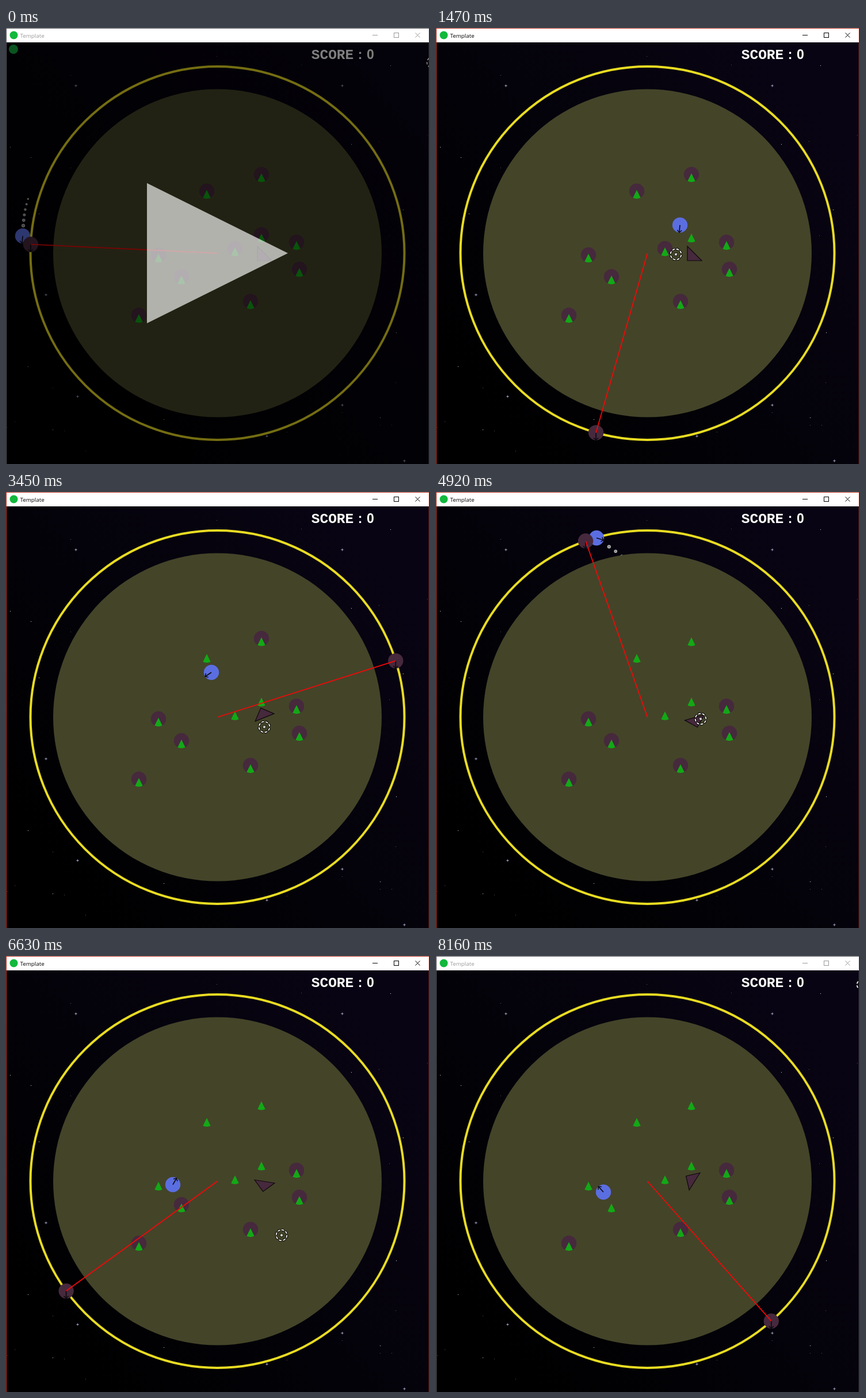
Recreate the animation shown at these times as an HTML page with a canvas. Size 737 by 759 pixels, loop 8.22 s.

```html
<!DOCTYPE html>
<html lang="en">
<head>
<meta charset="utf-8">
<title>Template</title>
<style>
  html, body { margin: 0; width: 100%; height: 100%; overflow: hidden; background: #000; }
  canvas { display: block; }
</style>
</head>
<body>
<canvas id="stage" width="737" height="759"></canvas>
<script>
const ctx = document.getElementById('stage').getContext('2d');
const LOOP = 8220, STEP = 30, START = 270, BLUR = 8130;
const CX = 367.5, CY = 392, RING = 325, REACH = 32;
const TAU = Math.PI * 2, DEG = Math.PI / 180;

// Key points: [time, ...values], interpolated linearly.
const player = [[-30, 38, 296, 95], [240, 29, 362, 95], [1060, 424, 343, 95], [1600, 424, 343, 95],
  [2250, 427, 368, 184], [2700, 357, 314, 146], [3700, 357, 314, 146], [4200, 435, 270, 50],
  [4780, 323, 109, 17], [4920, 279, 80, 17], [5280, 136, 103, -20], [6030, 288, 384, -60],
  [6630, 290, 398, -60], [8160, 291, 411, -132]];
const cursor = [[240, 741, 60], [960, 417, 394], [1920, 417, 394], [2250, 439, 394],
  [3450, 449, 409], [4920, 460, 395], [6120, 462, 423], [6630, 479, 486], [7740, 741, 50]];
const wedge = [[1920, 0], [2250, -66], [3450, -247], [4920, -421], [6630, -396], [8160, -283]];

const planets = [[444, 255], [349, 284], [444, 360], [505, 373], [398, 384],
  [265, 395], [510, 420], [305, 433], [425, 476], [231, 500]];
const bigStars = [[121, 100], [584, 100], [584, 656], [124, 641], [692, 753], [453, 710], [69, 464]];

function at(keys, t) {
  const i = keys.findIndex(k => k[0] > t);
  if (i <= 0) return keys[i ? keys.length - 1 : 0].slice(1);
  const a = keys[i - 1], b = keys[i], u = (t - a[0]) / (b[0] - a[0]);
  return a.slice(1).map((v, j) => v + (b[j + 1] - v) * u);
}

// A planet loses its disc once the player first comes within reach.
const visits = planets.map(([px, py]) => {
  for (let t = 0; t < LOOP; t += STEP) {
    const [x, y] = at(player, t);
    if (Math.hypot(x - px, y - py) < REACH) return t;
  }
  return Infinity;
});

function rect(x, y, w, h, color) {
  ctx.fillStyle = color;
  ctx.fillRect(x, y, w, h);
}

function disc(x, y, r, color) {
  ctx.fillStyle = color;
  ctx.beginPath();
  ctx.arc(x, y, r, 0, TAU);
  ctx.fill();
}

function ring(x, y, r, color, width) {
  ctx.strokeStyle = color;
  ctx.lineWidth = width;
  ctx.beginPath();
  ctx.arc(x, y, r, 0, TAU);
  ctx.stroke();
}

function path(points, stroke, width, fill) {
  ctx.beginPath();
  points.forEach(p => ctx.lineTo(...p));
  if (fill) {
    ctx.closePath();
    ctx.fillStyle = fill;
    ctx.fill();
  }
  if (stroke) {
    ctx.strokeStyle = stroke;
    ctx.lineWidth = width;
    ctx.stroke();
  }
}

function placed(x, y, degrees, draw) {
  ctx.save();
  ctx.translate(x, y);
  ctx.rotate(degrees * DEG);
  draw();
  ctx.restore();
}

function arrow(x, y, degrees) {
  placed(x, y, degrees, () => {
    path([[0, 0], [13, 0]], '#0a0a10', 1.6);
    path([[9, -4], [13, 0], [9, 4]], '#0a0a10', 1.4);
  });
}

function sky() {
  const g = ctx.createLinearGradient(60, 640, 680, 120);
  g.addColorStop(0, '#000');
  g.addColorStop(0.4, '#030208');
  g.addColorStop(1, '#090414');
  rect(0, 25, 737, 734, g);
  let seed = 7;
  const random = () => (seed = seed * 16807 % 2147483647) / 2147483647;
  for (let i = 0; i < 70; i++) {
    const x = Math.floor(random() * 735), y = Math.floor(25 + random() * 734);
    rect(x, y, 1, 1, i % 3 ? '#55555f' : '#d8d8e4');
  }
  for (const [x, y] of bigStars) {
    rect(x - 2, y, 5, 1, '#77779a');
    rect(x, y - 2, 1, 5, '#77779a');
    rect(x, y, 1, 1, '#fff');
  }
}

function smoke(t) {
  for (let age = 74; age < 270; age += 38) {
    const [x, y] = at(player, t - age), [nx, ny] = at(player, t - age + STEP);
    if (Math.hypot(nx - x, ny - y) < 4) continue;
    const px = x + Math.sin(age) * age / 50, r = 3.6 - age / 130;
    disc(px, y, r, '#d0d0d0');
    disc(px, y, r - 1, '#858585');
  }
}

function planet(x, y, visited) {
  if (!visited) disc(x, y, 13.2, '#46293c');
  ctx.fillStyle = '#13a816';
  ctx.beginPath();
  ctx.moveTo(x, y - 2);
  ctx.lineTo(x + 6.7, y + 11.5);
  ctx.quadraticCurveTo(x, y + 15, x - 6.7, y + 11.5);
  ctx.fill();
}

function crosshair(t) {
  const [x, y] = at(cursor, t), dash = 9.3 * TAU / 8;
  placed(x, y, t * 0.095, () => {
    for (const [color, pad] of [['#000', 1], ['#fff', 0]]) {
      ctx.setLineDash([dash * 0.6 + pad, dash * 0.4 - pad]);
      ctx.lineDashOffset = pad / 2;
      ring(0, 0, 9.3, color, 1.8 + pad * 2);
      ctx.setLineDash([]);
      path([[-2.5 - pad, 0], [2.5 + pad, 0]], color, 1.4 + pad);
      path([[0, -2.5 - pad], [0, 2.5 + pad]], color, 1.4 + pad);
    }
  });
}

function score() {
  ctx.textAlign = 'center';
  ctx.fillStyle = '#fff';
  ctx.font = 'bold 24.5px "Liberation Mono", monospace';
  ctx.fillText('SCORE', 567.5, 54);
  ctx.font = 'bold 23px "Liberation Sans", sans-serif';
  ctx.fillText(':', 615.5, 54);
  ctx.fillText('0', 633.5, 54);
}

function game(t) {
  const [x, y, heading] = at(player, t);
  const angle = (197.7 - 0.0624 * t) * DEG;
  const ox = CX + Math.cos(angle) * RING, oy = CY + Math.sin(angle) * RING;

  sky();
  smoke(t);
  disc(CX, CY, 285.5, '#444429');
  ring(CX, CY, RING, '#e9dc22', 4);
  planets.forEach(([px, py], i) => planet(px, py, t >= visits[i]));
  placed(449.5, 392.5, at(wedge, t)[0], () =>
    path([[-12.5, -12.5], [-12.5, 12.5], [12.5, 12.5], [-12.5, -12.5]], '#0c080b', 1.2, '#46293c'));
  disc(x, y, 13.2, '#5b6ee1');
  arrow(x, y, heading);
  disc(ox, oy, 13.2, '#46293c');
  arrow(ox, oy, 90);
  path([[CX, CY], [ox, oy]], '#f20808', 1.8);
  score();
  crosshair(t);
}

function pauseScreen() {
  rect(0, 25, 737, 734, 'rgba(0,0,0,.5)');
  path([[245, 270], [490, 392], [245, 514]], null, 0, 'rgba(255,255,255,.65)');
  disc(13, 37, 8, 'rgba(19,168,60,.5)');
}

function windowFrame(focused) {
  const ink = focused ? '#000' : '#999', edge = focused ? '#b8321f' : '#55555a';
  rect(0, 0, 735, 25, '#fff');
  disc(13.5, 12.5, 7, '#12b83c');
  ctx.font = '9.8px "Open Sans", sans-serif';
  ctx.textAlign = 'left';
  ctx.fillStyle = ink;
  ctx.fillText('Template', 24.5, 16.5);
  path([[637, 12.5], [646, 12.5]], ink, 1);
  ctx.strokeRect(674.5, 8.5, 8, 8);
  path([[711.5, 8.5], [719.5, 16.5]], ink, 1);
  path([[719.5, 8.5], [711.5, 16.5]], ink, 1);
  rect(0, 0, 735, 1, edge);
  rect(0, 0, 1, 759, edge);
  rect(735, 0, 1, 759, edge);
  rect(736, 0, 1, 759, '#242428');
}

function frame(now) {
  const tick = Math.floor(now % LOOP / STEP) * STEP;
  const paused = tick < START;
  game(Math.min(Math.max(tick, 240), 8160));
  if (paused) pauseScreen();
  windowFrame(!paused && tick < BLUR);
  requestAnimationFrame(frame);
}
requestAnimationFrame(frame);
</script>
</body>
</html>
```
